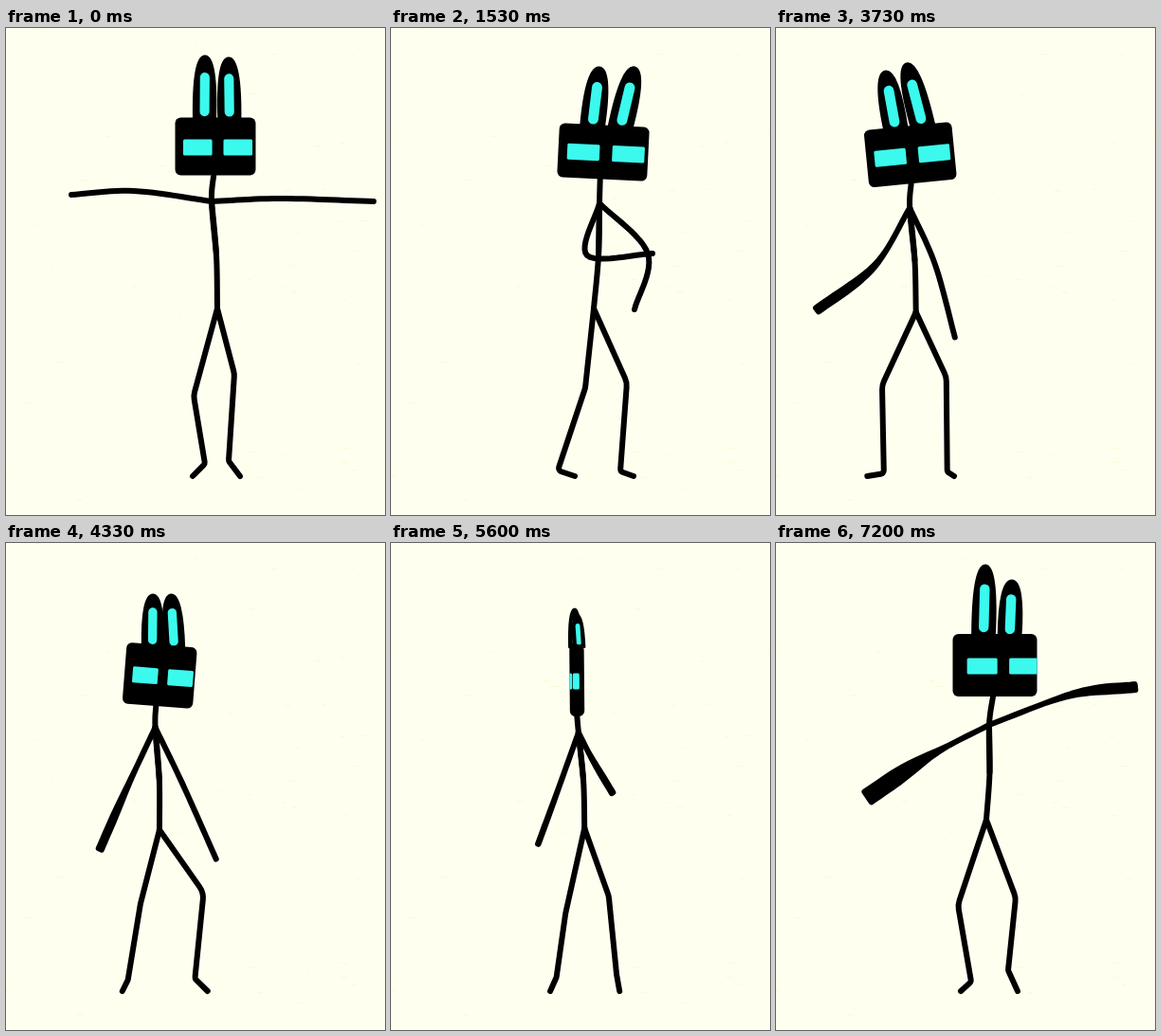
Recreate the animation shown at these times as an HTML page with a canvas. Size 400x514 px, loop 7.27 s.

```html
<!DOCTYPE html>
<html lang="en">
<head>
<meta charset="utf-8">
<title>Dancing stick figure</title>
<style>
html, body { margin: 0; width: 100%; height: 100%; overflow: hidden; background: #fffff0; }
canvas { display: block; }
</style>
</head>
<body>
<canvas id="stage" width="400" height="514"></canvas>
<script>
const ctx = document.getElementById('stage').getContext('2d');
const LOOP = 7270, TICK = LOOP / 109, GROUND = 473, LINE = 6;
const INK = '#000', GLOW = '#3cf9ee', PAPER = '#fffff0';

// head: centre, width, height, tilt, look   ears: two tips
// body: shoulder, hip   arm: elbow, hand, tip width   leg: knee, ankle, toe x
const poses = [
  { tick: 0, head: [221, 125, 85, 61, 0, 0.03], ears: [210, 30, 235, 32], body: [217, 183, 223, 296],
    armL: [135, 172, 69, 176, 6], armR: [290, 180, 388, 183, 6],
    legL: [198, 388, 210, 460, 197], legR: [241, 365, 235, 457, 247] },
  { tick: 23, head: [224, 131, 95, 57, 0.05, 0.03], ears: [220, 42, 257, 42], body: [220, 185, 214, 296],
    armL: [207, 240, 276, 238, 6], armR: [271, 238, 257, 297, 6],
    legL: [205, 380, 176, 467, 194], legR: [249, 374, 242, 468, 256] },
  { tick: 39, head: [214, 132, 16, 60, -0.18, -0.35], ears: [201, 66, 201, 66], body: [227, 192, 209, 298],
    armL: [183, 236, 120, 218, 6], armR: [201, 242, 142, 260, 6],
    legL: [165, 383, 182, 469, 159], legR: [218, 390, 248, 473, 231] },
  { tick: 56, head: [141, 134, 94, 61, -0.09, 0.03], ears: [115, 46, 138, 38], body: [140, 190, 147, 300],
    armL: [103, 252, 44, 300, 11], armR: [168, 250, 191, 328, 6],
    legL: [112, 377, 113, 470, 96], legR: [180, 368, 180, 468, 188] },
  { tick: 74, head: [208, 150, 29, 72, 0.34, 0], ears: [234, 73, 243, 88], body: [199, 203, 197, 307],
    armL: [179, 272, 204, 353, 6], armR: [224, 260, 270, 329, 6],
    legL: [201, 389, 166, 446, 178], legR: [262, 373, 242, 446, 261] },
  { tick: 92, head: [187, 140, 13, 78, -0.27, -0.5], ears: [162, 64, 162, 64], body: [196, 197, 208, 296],
    armL: [167, 258, 111, 288, 6], armR: [207, 201, 213, 212, 9],
    legL: [169, 391, 180, 468, 159], legR: [205, 372, 233, 463, 225] },
  { tick: 108, head: [231, 129, 89, 66, 0, 0.1], ears: [221, 24, 249, 40], body: [225, 192, 222, 292],
    armL: [160, 226, 97, 268, 19], armR: [312, 160, 379, 152, 12],
    legL: [192, 382, 206, 463, 195], legR: [253, 374, 245, 451, 255] }
];

// A new drawing on every tick, except for evenly spread holds.
const held = new Set();
for (let at = 2.41; at < 109; at += 3.64) held.add(Math.floor(at));

function hermite(a, b, ma, mb, u) {
  const u2 = u * u, u3 = u2 * u;
  return a * (2 * u3 - 3 * u2 + 1) + ma * (u3 - 2 * u2 + u)
       + b * (3 * u2 - 2 * u3) + mb * (u3 - u2);
}

function poseAt(tick) {
  let k = 0;
  while (k < poses.length - 2 && tick >= poses[k + 1].tick) k++;
  const b = poses[k], c = poses[k + 1];
  const a = poses[k - 1] || b, d = poses[k + 2] || c;
  const u = (tick - b.tick) / (c.tick - b.tick), pose = {};
  for (const part in b) {
    if (part === 'tick') continue;
    pose[part] = b[part].map((v, i) => hermite(v, c[part][i],
      (c[part][i] - a[part][i]) * 0.25, (d[part][i] - v) * 0.25, u));
  }
  return pose;
}

function pen(color, width) {
  ctx.fillStyle = ctx.strokeStyle = color;
  ctx.lineWidth = width;
  ctx.beginPath();
}

// Smooth line through a, b and c, swelling towards the tip.
function brush(a, b, c, tip = LINE) {
  const left = [], right = [], steps = 24;
  const spot = v => {
    const i = v < 0.5 ? 0 : 1, bend = j => (c[j] - a[j]) / 2;
    return [0, 1].map(j => i === 0
      ? hermite(a[j], b[j], (b[j] - a[j]) * 0.75, bend(j), v * 2)
      : hermite(b[j], c[j], bend(j), (c[j] - b[j]) * 0.75, v * 2 - 1));
  };
  for (let s = 0; s <= steps; s++) {
    const v = s / steps, [x, y] = spot(v);
    const [x1, y1] = spot(Math.max(0, v - 0.01)), [x2, y2] = spot(Math.min(1, v + 0.01));
    const len = Math.hypot(x2 - x1, y2 - y1) || 1;
    const e = Math.min(1, Math.max(0, (v - 0.3) / 0.5));
    const r = (tip - LINE) / 2 * e * e * (3 - 2 * e) / len;
    left.push([x - (y2 - y1) * r, y + (x2 - x1) * r]);
    right.unshift([x + (y2 - y1) * r, y - (x2 - x1) * r]);
  }
  pen(INK, LINE);
  for (const p of left.concat(right)) ctx.lineTo(...p);
  ctx.fill();
  ctx.stroke();
}

function arm(shoulder, [ex, ey, hx, hy, tip]) {
  brush(shoulder, [ex, ey], [hx, hy], tip);
}

function leg(hip, [kx, ky, ax, ay, toe]) {
  pen(INK, LINE);
  ctx.moveTo(...hip);
  ctx.arcTo(kx, ky, ax, ay, 20);
  ctx.arcTo(ax, ay, toe, GROUND, 4);
  ctx.lineTo(toe, GROUND);
  ctx.stroke();
}

function ear([bx, by], tx, ty, w) {
  const dx = tx - bx, dy = ty - by, len = Math.hypot(dx, dy) || 1;
  const nx = -dy / len * w / 2, ny = dx / len * w / 2;
  const at = (along, side) => [bx + dx * along + nx * side, by + dy * along + ny * side];
  pen(INK, 3);
  ctx.moveTo(...at(0, -1));
  ctx.bezierCurveTo(...at(0.65, -1.1), ...at(1, -0.75), ...at(1, 0));
  ctx.bezierCurveTo(...at(1, 0.75), ...at(0.65, 1.1), ...at(0, 1));
  ctx.fill();
  ctx.stroke();
  pen(GLOW, w * 0.46);
  ctx.moveTo(...at(0.13, 0));
  ctx.lineTo(...at(0.67, 0));
  ctx.stroke();
}

function face([x, y, w, h, tilt, look]) {
  ctx.save();
  ctx.translate(x, y);
  ctx.rotate(tilt);
  pen(INK, 1);
  ctx.roundRect(-w / 2, -h / 2, w, h, Math.min(6, w / 2));
  ctx.fill();
  ctx.clip();
  const ew = Math.max(7, w * 0.36), eh = 17;
  for (const side of [-0.25, 0.25]) {
    pen(GLOW, 1);
    ctx.roundRect((look + side) * w - ew / 2, 1 - eh / 2, ew, eh, 1.5);
    ctx.fill();
  }
  ctx.restore();
}

function paper() {
  ctx.fillStyle = PAPER;
  ctx.fillRect(0, 0, 400, 514);
  let seed = 7;
  const rnd = () => (seed = seed * 16807 % 2147483647) / 2147483647;
  for (let i = 0; i < 45; i++) {
    const x = rnd() * 400, y = rnd() * 514;
    pen('rgba(240,230,130,0.25)', 1);
    ctx.moveTo(x, y);
    ctx.lineTo(x + 2 + rnd() * 6, y + rnd() * 3 - 1.5);
    ctx.stroke();
  }
}

function draw(tick) {
  const p = poseAt(tick);
  const [x, y, w, h, tilt] = p.head;
  const onHead = (u, v) => [
    x + u * w * Math.cos(tilt) - v * h * Math.sin(tilt),
    y + u * w * Math.sin(tilt) + v * h * Math.cos(tilt)];
  const shoulder = p.body.slice(0, 2), hip = p.body.slice(2);
  const waist = shoulder.map((v, i) => (v + hip[i]) / 2 + (i ? 0 : 2));
  paper();
  brush(onHead(-0.02, 0.48), shoulder, waist);
  brush(shoulder, waist, hip);
  leg(hip, p.legL);
  leg(hip, p.legR);
  arm(shoulder, p.armL);
  arm(shoulder, p.armR);
  ear(onHead(-0.135, -0.46), p.ears[0], p.ears[1], 8 + w * 0.165);
  ear(onHead(0.175, -0.46), p.ears[2], p.ears[3], 8 + w * 0.165);
  face(p.head);
}

ctx.lineCap = ctx.lineJoin = 'round';
const begin = performance.now();
let shown = -1;

function loop() {
  // Half a rounding step of slack keeps each change on its 10 ms mark.
  let tick = Math.floor(((performance.now() - begin) % LOOP + 4) / TICK) % 109;
  if (held.has(tick)) tick--;
  if (tick !== shown) draw(shown = tick);
  requestAnimationFrame(loop);
}
loop();
</script>
</body>
</html>
```
